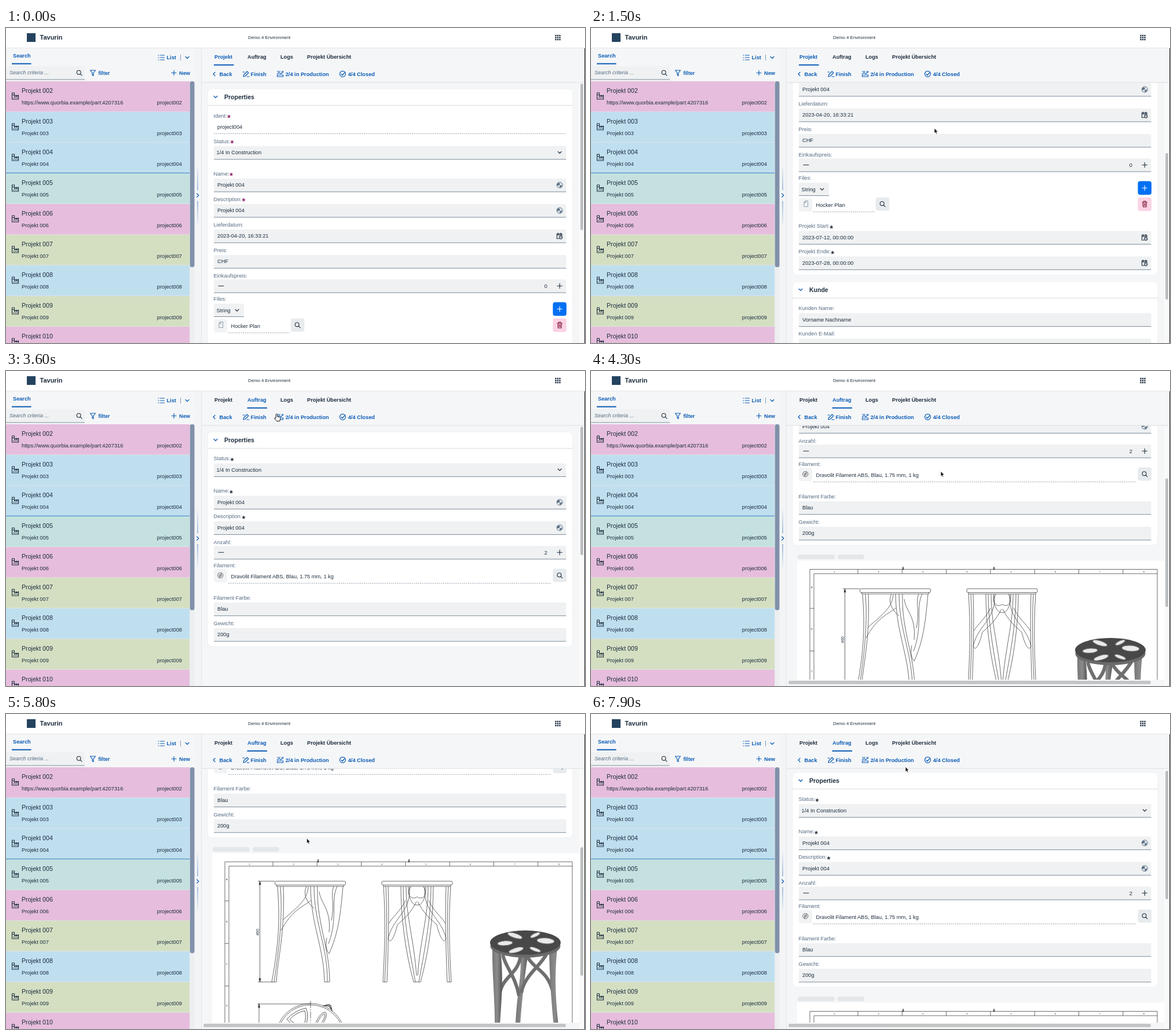
These frames come from a looping animation (1000x544 px, 8000 ms). An HTML page:

```html
<!DOCTYPE html>
<html lang="de">
<head>
<meta charset="utf-8">
<title>Projektverwaltung</title>
<style>
html,body{margin:0;width:100%;height:100%;overflow:hidden;background:#f5f6f7}
svg{display:block;width:100vw;height:100vh;font-family:"Liberation Sans",Arial,sans-serif;fill:#1d2d3e}
text{white-space:pre}
.b{font-weight:bold}
.blue{fill:#0b5cb5}
.label{fill:#556b82}
.line{fill:none;stroke:#1d2d3e;stroke-width:1.1;stroke-linecap:round;stroke-linejoin:round}
.act{fill:none;stroke:#0b5cb5;stroke-width:1.2;stroke-linecap:round;stroke-linejoin:round}
.cad{fill:none;stroke:#3a3a3a;stroke-width:.75}
.dash{fill:none;stroke:#7d8c9c;stroke-width:.8;stroke-dasharray:2 1.6}
</style>
</head>
<body>
<svg id="stage" viewBox="0 0 1000 544" preserveAspectRatio="none"></svg>
<script>
const text = (x, y, s, size = 9.25, attr = '') => `<text x="${x}" y="${y}" font-size="${size}" ${attr}>${s}</text>`;
const rect = (x, y, w, h, fill, attr = '') => `<rect x="${x}" y="${y}" width="${w}" height="${h}" fill="${fill}" ${attr}/>`;
const path = (d, cls = 'line', attr = '') => `<path d="${d}" class="${cls}" ${attr}/>`;
const ring = (x, y, r, cls = 'line') => `<circle cx="${x}" cy="${y}" r="${r}" class="${cls}"/>`;
const oval = (x, y, rx, ry, turn = 0, attr = 'class="cad"') =>
  `<ellipse cx="${x}" cy="${y}" rx="${rx}" ry="${ry}" transform="rotate(${turn} ${x} ${y})" ${attr}/>`;
const group = (id, body, attr = '') => `<g id="${id}" ${attr}>${body}</g>`;
const chevron = (x, y, cls = 'line') => path(`M${x - 3} ${y - 1.5}l3 3 3-3`, cls);
const lens = (x, y, cls = 'line') => ring(x - .8, y - .8, 3.4, cls) + path(`M${x + 1.8} ${y + 1.8}l2.8 2.8`, cls);

// Form parts, y is the middle of the label
const label = (y, s, star) => {
  const mark = star ? `<tspan dy="5.3" dx=".5" font-size="14" class="b" fill="${star}">*</tspan>` : '';
  return text(358.5, y + 3.3, s + ':' + mark, 9.25, 'class="label"');
};
const box = (y, h = 23) => rect(359, y, 608.5, h, '#eff1f2', 'rx="2"') + rect(359, y + h - .6, 608.5, 1, '#7d8c9c');
const globe = y => `<circle cx="956.3" cy="${y}" r="5" fill="#dfe6ec" stroke="#5d7083"/>` +
  `<path d="M953 ${y - 4}l4 1-1 3-3 1-2-2zM956 ${y + 1}l4-1 0 2-3 3z" fill="#5d7083"/>`;
const calendar = y => path(`M955 ${y + 4.5}h-3.5v-8.5h8.5v3M951.5 ${y - 1.8}h8.5M953.5 ${y - 5.2}v2M958 ${y - 5.2}v2`) +
  ring(958.2, y + 2.4, 2.6) + path(`M958 ${y + 1.2}v1.4h1`, 'line', 'style="stroke-width:.7"');
const field = (y, name, value, icon, star) => label(y, name, star) + box(y + 8.5) +
  text(365, y + 22.8, value) + (icon ? icon(y + 19.7) : '');
const stepper = (y, name, n) => label(y, name) + box(y + 6.7) + path(`M367 ${y + 18}h9M952 ${y + 18}h8.5M956.3 ${y + 13.8}v8.5`) +
  text(935, y + 21.3, n, 9.25, 'text-anchor="end"');
const choice = (y, star) => label(y, 'Status', star) + box(y + 8.5) + text(363.5, y + 22.8, '1/4 In Construction') + chevron(956.3, y + 19.5);
const card = (y, h, title) => rect(348, y, 631, h, '#fff', 'rx="8" stroke="#eceef0" stroke-width=".8"') + chevron(362, y + 14, 'act') +
  text(377, y + 17.8, title, 10.5, 'class="b"') + rect(348, y + 28, 631, 1, '#d9dcdf');
const dashed = (x, y, w) => path(`M${x} ${y}h${w}`, 'dash');
const lensButton = (x, y) => rect(x - 11.7, y - 11.5, 23.5, 23, '#e8ebed', 'rx="4"') + lens(x, y);
const thumbBox = y => rect(359, y - 11, 23, 23, '#f1f3f4', 'rx="4"');

// Header and list on the left
const gridIcon = [0, 1, 2].flatMap(r => [0, 1, 2].map(c => rect(948.3 + c * 3.5, 11.8 + r * 3.5, 2.4, 2.4, '#1d2d3e'))).join('');
const banner = rect(0, 0, 1000, 34, '#fff') + rect(0, 34, 1000, 1, '#e3e6e8') + rect(36, 9, 15, 15, '#25435f') +
  text(58.5, 20, 'Tavurin', 11, 'class="b"') + text(418, 19, 'Demo 4 Environment', 7.8) + gridIcon;

const tones = { p: '#e6bddd', b: '#bfdfef', t: '#c4e1e0', g: '#d4dfc2' };
const rows = [...'pbbtpgbgp'].map((c, i) => {
  const y = 92 + i * 53, id = '0' + String(i + 2).padStart(2, '0');
  const note = i ? 'Projekt ' + id : 'https://www.quorbia.example/part:4207316';
  return rect(0, y, 317.5, 53, tones[c]) + rect(0, y + 52.3, 317.5, .8, '#e4e6ea') +
    path(`M10.5 ${y + 20}v11h11v-7l-3.5 2.5v-2.5l-3.5 2.5v-6.5zM10.5 ${y + 23.5}h3.5M13 ${y + 28.5}h1M16 ${y + 28.5}h1M19 ${y + 28.5}h1`) +
    text(27, y + 19.8, 'Projekt ' + id, 10.65) + text(27, y + 39.6, note) +
    text(304, y + 39.6, 'project' + id, 9.25, 'text-anchor="end"');
}).join('') + rect(0, 249.8, 317.5, 1.1, '#4385cf');

const list = rect(0, 35, 326, 509, '#f5f6f7') + text(12, 51.3, 'Search', 9.2, 'class="b blue"') + rect(10, 60.7, 33.5, 2, '#0b5cb5') +
  path('M263 47h1M263 51h1M263 55h1M266.5 47h7M266.5 51h7M266.5 55h7', 'act') +
  text(277.5, 54, 'List', 9.2, 'class="b blue"') + rect(301, 46, 1, 10, '#7d9cc0') + chevron(313, 51, 'act') +
  rect(0, 66, 136, 23, '#eff1f2') + rect(0, 88.5, 136, 1, '#7d8c9c') +
  text(6, 80.3, 'Search criteria ...', 9, 'font-style="italic" class="label"') + lens(126.5, 77.5) +
  path('M145.5 73h9l-3.5 4.5v5l-2-1.5v-3.5z', 'act') + text(159.5, 80.5, 'filter', 9.2, 'class="b blue"') +
  path('M286 77.5h8M290 73.5v8', 'act') + text(299, 80.5, 'New', 9.2, 'class="b blue"') + rows +
  rect(317.5, 92, 8, 452, '#eceef0') + rect(317.7, 92, 7.8, 321, '#8091aa', 'rx="3.5"');

const splitter = rect(326, 35, 12, 509, '#f3f4f6') + rect(337, 35, 1, 509, '#e2e5e8') +
  rect(330.5, 240, 1, 40, 'url(#up)') + rect(330.5, 299, 1, 40, 'url(#down)') + path('M329.8 286l3 3-3 3', 'act');

// Tabs and actions
const tabs = [[360, 'Projekt'], [417, 'Auftrag'], [474, 'Logs'], [520, 'Projekt Übersicht']];
const actions = rect(338, 35, 660, 59, '#f5f6f8') + rect(338, 93.5, 660, 1, '#dcdfe2') +
  tabs.map(([x, s], i) => text(x, 53.3, s, 9.2, `class="b" id="tab${i}"`)).join('') +
  rect(359, 62.8, 34.5, 2, '#0b5cb5', 'id="under"') +
  rect(461, 67, 104, 24.5, '#fff', 'rx="5" stroke="#bccbdc" id="hover"') +
  path('M361 76.5l-3 3 3 3', 'act') +
  path('M410 84l.8-3.5 5.5-5.5 2.5 2.5-5.5 5.5zM409 76h3M416 84h4', 'act') +
  path('M468.5 75h5M468.5 79l3-2 3 2 4-3M468.5 84h10v-3h-10zM476 75h3', 'act') +
  ring(581.5, 79.3, 5, 'act') + path('M579 79.5l2 2 3.5-4', 'act') +
  [[368.5, 'Back'], [422.5, 'Finish'], [482.7, '2/4 in Production'], [590.7, '4/4 Closed']]
    .map(([x, s]) => text(x, 82.6, s, 9.25, 'class="b blue"')).join('');

const plum = '#8b1863', ink = '#222c38';
const project = card(105, 531, 'Properties') +
  label(151.5, 'Ident', plum) + text(365, 174.3, 'project004') + dashed(359, 182.5, 608) +
  choice(195.5, plum) + field(251.5, 'Name', 'Projekt 004', globe, plum) +
  field(295.5, 'Description', 'Projekt 004', globe, plum) +
  field(339.5, 'Lieferdatum', '2023-04-20, 16:33:21', calendar) + field(383.5, 'Preis', 'CHF') +
  stepper(427.5, 'Einkaufspreis', '0') + label(467.5, 'Files') +
  rect(359, 476, 52, 22.5, '#eff1f2', 'rx="2"') + rect(359, 498, 52, 1, '#7d8c9c') + text(363.5, 490.6, 'String') + chevron(399, 487.5) +
  rect(944.5, 473.5, 23.5, 23.5, '#0070f2', 'rx="4"') + path('M952 485.3h8.5M956.25 481v8.5', 'line', 'style="stroke:#fff"') +
  rect(944.5, 501.5, 23.5, 23.5, '#fbd3e4', 'rx="4"') +
  path('M952 510h8.5M954.5 510v-2h3.5v2M953 510l.5 8h5.5l.5-8M955.3 512v4M957.3 512v4', 'line', 'style="stroke:#7a1030"') +
  thumbBox(514) + path('M368 510l3-2.5h3.5v10h-6.5zM368 510.5h3v-3', 'line', 'style="stroke:#9aa5b0"') +
  text(388.5, 518, 'Hocker Plan') + dashed(384, 526.5, 106) + lensButton(503.5, 513) +
  field(551, 'Projekt Start', '2023-07-12, 00:00:00', calendar, ink) +
  field(595, 'Projekt Ende', '2023-07-28, 00:00:00', calendar, ink) +
  card(647, 218.5, 'Kunde') +
  [['Name', 'Vorname Nachname'], ['E-Mail', 'name@ort.example'], ['Tel. Nr.', '+41'], ['Adresse', 'Strasse Nr ,PLZ Ort']]
    .map(([n, v], i) => field(693 + i * 44, 'Kunden ' + n, v)).join('');

const order = card(105, 371, 'Properties') + choice(151, ink) + field(207, 'Name', 'Projekt 004', globe, ink) +
  field(251, 'Description', 'Projekt 004', globe, ink) + stepper(295.3, 'Anzahl', '2') + label(335.3, 'Filament') +
  thumbBox(353) + ring(370.3, 353, 4.6, 'cad') + ring(370.3, 353, 2, 'cad') + path('M368 357l5-8', 'cad') +
  text(388.5, 358.3, 'Dravolit Filament ABS, Blau, 1.75 mm, 1 kg') + dashed(384, 366.5, 558) + lensButton(956.3, 353) +
  field(391.3, 'Filament Farbe', 'Blau') + field(435.5, 'Gewicht', '200g');

// Technical drawing
const spans = n => Array.from({ length: n }, (_, i) => i);
const sheet = path('M378 522V103.5H978V522M385 522V111H978' +
    spans(7).map(i => `M${461 + i * 76.3} 103.5v7.5`).join('') + spans(5).map(i => `M378 ${171 + i * 73.5}h7`).join(''), 'cad') +
  spans(8).map(i => text(419 + i * 76.4, 109, i + 1, 4)).join('') +
  spans(6).map(i => text(380, 135.5 + i * 72.7, 'ABCDEF'[i], 4)).join('') +
  path('M538 104l1-5 1 5zM695 104l1-5 1 5z', 'cad', 'style="fill:#222"');

const seat = x => `<rect x="${x}" y="137" width="122" height="6.5" rx="2" class="cad"/>` + path(`M${x + 3} 143.5v2.5h116v-2.5`, 'cad');
const frontView = seat(464.5) + path('M469 146C472 190 474 230 459 311H467C469 270 482 230 479 146M474 146C478 200 472 250 463 311' +
  'M522 147C520 170 505 180 478 204M527 170C515 180 495 185 475 222M519 146C513 158 518 172 532 184' +
  'M526 146C527 215 549 250 550 311H559C559 250 536 210 538 146M532 146C532 210 556 250 555 311' +
  'M572 146C560 170 574 200 557 245M582 146C578 190 575 225 558 262C552 255 552 245 554 235M541 155C543 175 562 185 558 225M566 146C560 160 568 175 562 205', 'cad');
const half = path('M652 146C656 200 654 260 651 311H658C660 260 662 200 660 146M656 146C659 200 657 260 654 311' +
  'M697 147C700 190 668 200 660 236C664 248 672 230 676 212C690 200 700 190 709 172M690 170C682 188 668 198 661 210' +
  'M682 146C682 200 690 260 704 311H710M691 146C691 200 705 240 709 300M686 146C686 200 696 250 707 311M700 146C690 155 698 172 710 164M695 146C694 160 700 180 710 178', 'cad');
const sideView = seat(649) + half + `<g transform="matrix(-1 0 0 1 1420 0)">${half}</g>`;

const wedge = turn => `<g transform="rotate(${turn} 526 408)">` +
  path('M547 406Q561 390 575 389Q581 408 575 427Q561 426 547 410Q545 408 547 406Z', 'cad') +
  path('M550 407Q562 395 572 393Q577 408 572 423Q562 421 550 409Z', 'cad') +
  oval(491, 408, 16.5, 6) + oval(491, 408, 13, 3.5) +
  path('M467 399l-7 7v4l7 7M465 402l-3 6 3 6', 'cad', 'style="stroke-width:1.3"') + '</g>';
const topView = ring(526, 408.5, 60.5, 'cad') + ring(526, 408.5, 58, 'cad') + [0, 120, 240].map(wedge).join('') +
  path('M457 408.5H592M526 344V500', 'cad', 'stroke-dasharray="12 2 2 2"');

const arrowHeads = 'M437 143l1.5-6 1.5 6zM437 305l1.5 6 1.5-6zM435.5 355l1.5-6 1.5 6zM435.5 463l1.5 6 1.5-6zM465 494.5l-6 1.5 6 1.5zM520 494.5l6 1.5-6 1.5z';
const sizes = path('M438.5 137V311M435 137H464M435 311H460M437 349V469M434 349H526M434 469H526M459 496H526M459 412V499', 'cad') +
  path(arrowHeads, 'cad', 'style="fill:#222"') + text(486.5, 494.5, '175', 7) +
  text(0, 0, '460', 7, 'transform="translate(437 231) rotate(-90)"') + text(0, 0, '∅ 320', 7, 'transform="translate(435.5 418) rotate(-90)"');

const strut = d => path(d, '', 'fill="none" stroke="#6f6f6f" stroke-width="6"');
const leg = d => path(d, '', 'fill="url(#leg)"');
const model = leg('M888 260C892 300 882 330 880 384L888 385C891 340 896 300 902 260Z') +
  strut('M852 335C856 300 885 300 889 264') + strut('M901 268C912 290 936 290 945 330') + strut('M886 335C880 300 862 285 858 264') + strut('M890 330C895 300 922 285 934 262') +
  leg('M840 252L854 258C861 310 853 370 851 418L843 419C847 360 839 300 840 252Z') +
  leg('M938 258L952 252C946 310 950 360 958 415L949 418C943 360 939 310 938 258Z') +
  oval(897, 249, 60.5, 20, 0, 'fill="#6a6a6a"') + oval(897, 243, 61, 21, 0, 'fill="#484848"') +
  [[862, 244, 13, 4, -4], [879, 231, 13, 4, 18], [914, 230, 9, 3, -25], [932, 240, 15, 5, 4], [914, 255, 10, 3, 20], [881, 256, 13, 4, -16]]
    .map(([x, y, a, b, r]) => oval(x, y, a, b, r, 'fill="#e9e9e9" stroke="#777"')).join('');

const notes = [
  [698, 442.5, 'Material:   PLA'], [792, 442.5, 'Dimension:   Ø320x460'], [886, 442.5, 'Bemerkung'],
  [698, 452.5, 'Oberfläche:   roh'], [792, 452.5, 'Allgemeintoleranzen nach:  ISO 2768-m'], [886, 452.5, 'Ursprung'],
  [698, 461, 'Änderungen:'], [887, 462.5, 'Masse in mm nach Oberflächenbehandlung'], [887, 467.5, 'nicht vermasste Kanten 0.1...0.2x45° gebrochen', 3.8],
  [698, 473.5, 'Bezeichnung'], [698, 484.5, 'Hocker', 10], [887, 475.5, 'Massstab'], [890, 488, '1:4', 10],
  [911, 475.5, 'Gezeichnet'], [939, 475.5, 'rb'], [955, 475.5, '26.04.2023'], [911, 485.5, 'Geprüft'], [911, 495, 'Freigegeben'],
  [698, 502.5, 'Datei:'], [698, 507.5, 'Hocker'], [744, 502, 'Diese Zeichnung ist geistiges Eigentum und darf ohne Zustimmung', 3.4],
  [744, 506.5, 'weder vervielfältigt noch Dritten weitergegeben werden', 3.4], [858, 504, 'Format:  A3'], [886, 504, 'Blatt:  1 / 1'],
  [911, 503, 'zuletzt gespeichert am:'], [911, 507.5, 'Donnerstag, 26. April 2023', 3.4],
  [698, 519.5, 'Formolatz, CH-0047 Unterquelmatt', 8.7], [956, 519.5, '00', 10]
].map(([x, y, s, size = 4.3]) => text(x, y, s, size, 'fill="#222"')).join('');
const block = rect(695, 436, 283, 86, '#fff') + path('M695 522V436H978M695 446H978M695 456H978M695 469H978M695 498H978M695 509H978' +
  'M790 436V456M883 436V509M909 469V509M936 469V498M953 469V479M909 479H978M909 489H978M856 498V522M883 509V522M953 509V522', 'cad') +
  notes + path('M858 513l7-1v7l-7-1zM856 515.5h24', 'cad') + ring(873, 515.5, 4, 'cad') + ring(873, 515.5, 2, 'cad');
const plan = rect(357, 78, 64, 8, '#e4e7e9', 'rx="4"') + rect(426, 78, 46, 8, '#e4e7e9', 'rx="4"') + rect(356, 88.5, 634, 433.5, '#fff') +
  sheet + frontView + sideView + topView + sizes + model + block;

const fade = (id, a, b, x2, y2, stops = '') => `<linearGradient id="${id}" x2="${x2}" y2="${y2}"><stop stop-color="${a}"/>${stops}<stop offset="1" stop-color="${b}"/></linearGradient>`;
document.getElementById('stage').innerHTML = '<defs>' + fade('up', '#dfe8f2', '#4f86c4', 0, 1) + fade('down', '#4f86c4', '#dfe8f2', 0, 1) +
  fade('leg', '#777', '#555', 1, 0, '<stop offset=".5" stop-color="#8b8b8b"/>') +
  '<clipPath id="tall"><path d="M338 94.5h654v450h-654z"/></clipPath><clipPath id="short"><path d="M338 94.5h654v438.5h-654z"/></clipPath></defs>' +
  rect(0, 0, 1000, 544, '#f5f6f7') +
  group('page1', group('scroll1', project), 'clip-path="url(#tall)"') +
  group('page2', group('scroll2', order + group('plan', plan, 'transform="translate(0 414)"')), 'clip-path="url(#short)"') +
  rect(341, 535, 626, 5.8, '#c2c4c6', 'rx="2.9" id="hbar"') +
  rect(990.5, 95, 8, 449, '#fafafa') + rect(992, 96, 5, 253, '#bdbfc1', 'rx="2.5" id="vbar"') +
  actions + list + splitter + banner + rect(999, 35, 1, 509, '#2c2c2c') +
  group('cursor',
    path('M0 0v9l2-1.8 1.5 3 1.5-.8-1.5-2.8h2.8z', '', 'id="arrow" fill="#111" stroke="#fff" stroke-width=".8"') +
    path('M-2.5-5.5q2.5 0 2.5 1.5v8q0 1.5-2.5 1.5M2.5-5.5q-2.5 0-2.5 1.5v8q0 1.5 2.5 1.5M-1 1h2', 'line', 'id="beam" style="stroke-width:.8"') +
    path('M-1 6V1q0-1.5 1.2-1.5T1.5 1v3l4 1q1.5.5 1 3l-1 4h-5l-4-4.5q0-2 2.5-.5z', '', 'id="hand" fill="#fff" stroke="#111" stroke-width="1"'));

const $ = id => document.getElementById(id);
const show = (id, on) => $(id).setAttribute('display', on ? 'inline' : 'none');
const easeOut = k => k * (2 - k), linear = k => k;

function track(keys, t, ease = linear) {
  const i = keys.findIndex(k => k[0] > t);
  if (i === 0) return keys[0].slice(1);
  if (i < 0) return keys[keys.length - 1].slice(1);
  const a = keys[i - 1], b = keys[i], k = ease((t - a[0]) / (b[0] - a[0]));
  return a.slice(1).map((v, n) => v + (b[n + 1] - v) * k);
}

const scrollProject = [[600, 0], [1000, 110], [1200, 110], [1500, 209], [1700, 209], [2000, 333.5]];
const scrollOrder = [[4200, 0], [4300, 175], [4400, 238], [4700, 238], [4900, 414], [5100, 415], [5300, 415],
  [6200, 140], [6400, 116.5], [7000, 60], [7100, 60], [7900, 4]];
const pointer = [[100, 795, 151], [300, 593, 173], [2500, 593, 173], [2800, 481, 78], [3000, 481, 78], [3400, 433, 50], [3500, 433, 50],
  [4000, 604, 173], [4500, 604, 173], [4600, 606, 179], [5300, 606, 179], [6200, 450, 243], [6400, 446, 242], [7100, 446, 242], [7900, 543, 91]];

function draw(t) {
  const second = t >= 3500;
  const [s] = second ? track(scrollOrder, t) : track(scrollProject, t, easeOut);
  const [x, y] = track(pointer, t);
  show('page1', !second);
  show('page2', second);
  show('plan', t >= 3700);
  show('hbar', t >= 3700);
  $(second ? 'scroll2' : 'scroll1').setAttribute('transform', `translate(0 ${-s})`);
  $('vbar').setAttribute('y', 96 + s * (second ? .511 : .574));
  $('vbar').setAttribute('height', second ? 222 : 253);
  $('under').setAttribute('x', second ? 416.5 : 359);
  $('tab0').setAttribute('fill', second ? '#1d2d3e' : '#0b5cb5');
  $('tab1').setAttribute('fill', second ? '#0b5cb5' : '#1d2d3e');
  show('hover', t >= 2700 && t < 3100);

  const hand = t >= 2700 && t < 3700;
  const beam = t >= 500 && t < 700 || t >= 4600 && t < 5400;
  $('cursor').setAttribute('transform', `translate(${x} ${y})`);
  show('cursor', t >= 100);
  show('hand', hand);
  show('beam', beam);
  show('arrow', !hand && !beam);
}

// The screen advances ten times a second
function tick() {
  draw(Math.floor(performance.now() % 8000 / 100) * 100);
  requestAnimationFrame(tick);
}
tick();
</script>
</body>
</html>
```
